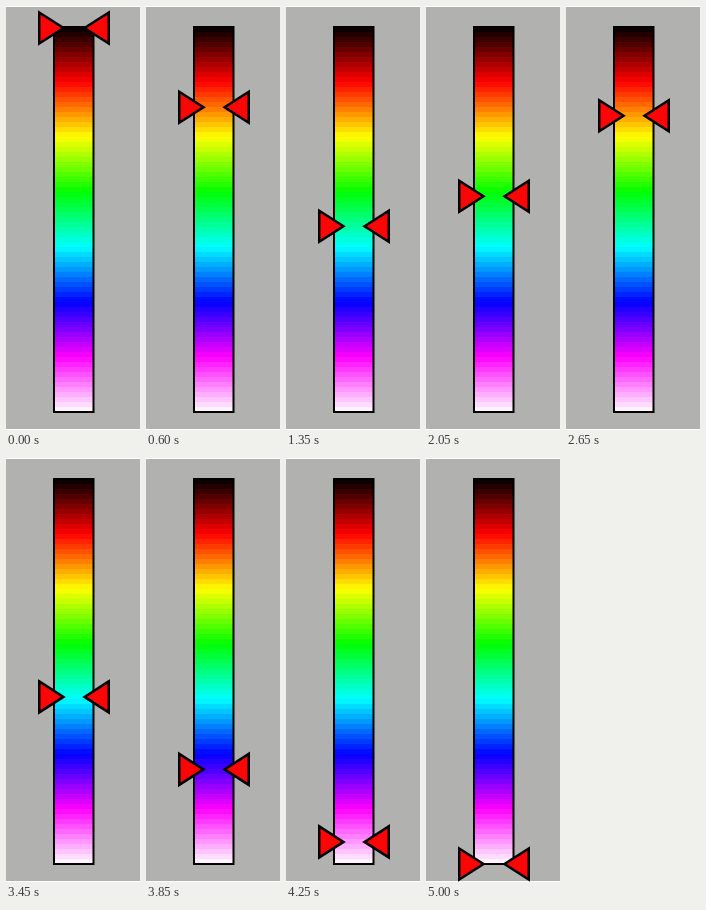
An HTML page with a canvas that plays this animation: 134x424 px, repeating every 5050 ms.

```html
<!DOCTYPE html>
<html lang="en">
<head>
<meta charset="utf-8">
<title>Colour scale</title>
<style>
  html, body { margin: 0; width: 100%; height: 100%; overflow: hidden; background: #b1b2af; }
  canvas { display: block; }
</style>
</head>
<body>
<canvas id="stage" width="134" height="424"></canvas>
<script>
const stage = document.getElementById('stage');
const ctx = stage.getContext('2d');
const LOOP = 5050, TICK = 50, MID = 68;
const BAR = { x: 48, y: 21, w: 39.5, h: 385 };
const BANDS = 77;

// Black, red, yellow, green, cyan, blue, magenta, white: one bit per channel.
const HUES = ['000', '100', '110', '010', '011', '001', '101', '111'];

function colourAt(part) {
  const pos = part * (HUES.length - 1);
  const i = Math.floor(pos), k = pos - i;
  const rgb = [0, 1, 2].map(c =>
    Math.round(255 * (HUES[i][c] * (1 - k) + HUES[i + 1][c] * k)));
  return `rgb(${rgb})`;
}

function ramp(t, from, to) {
  return Math.min(1, Math.max(0, (t - from) / (to - from)));
}

// Down to the middle, a short rest, back up, then down to the end.
function markerY(t) {
  return 22 + 218 * ramp(t, 100, 1475)
    - 137 * ramp(t, 1680, 2700)
    + 303 * ramp(t, 2700, 4372);
}

function drawBar() {
  const step = BAR.h / BANDS;
  for (let i = 0; i < BANDS; i++) {
    ctx.fillStyle = colourAt((i + 0.5) / BANDS);
    ctx.fillRect(BAR.x, BAR.y + i * step, BAR.w, step);
  }
  ctx.lineWidth = 2;
  ctx.strokeRect(BAR.x, BAR.y, BAR.w, BAR.h);
}

function drawMarker(side, y) {
  ctx.beginPath();
  ctx.moveTo(MID + side * 34.75, y - 15.5);
  ctx.lineTo(MID + side * 10.5, y);
  ctx.lineTo(MID + side * 34.75, y + 15.5);
  ctx.closePath();
  ctx.fillStyle = '#fa0606';
  ctx.fill();
  ctx.lineWidth = 2.5;
  ctx.stroke();
}

const start = performance.now();

function frame() {
  const elapsed = (performance.now() - start) % LOOP;
  const y = markerY(Math.floor(elapsed / TICK) * TICK);
  ctx.fillStyle = '#fff';
  ctx.fillRect(0, 0, stage.width, stage.height);
  ctx.fillStyle = '#b1b2af';
  ctx.fillRect(0, 1, stage.width, stage.height - 2);
  ctx.strokeStyle = '#000';
  drawBar();
  drawMarker(-1, y);
  drawMarker(1, y);
  requestAnimationFrame(frame);
}
frame();
</script>
</body>
</html>
```
